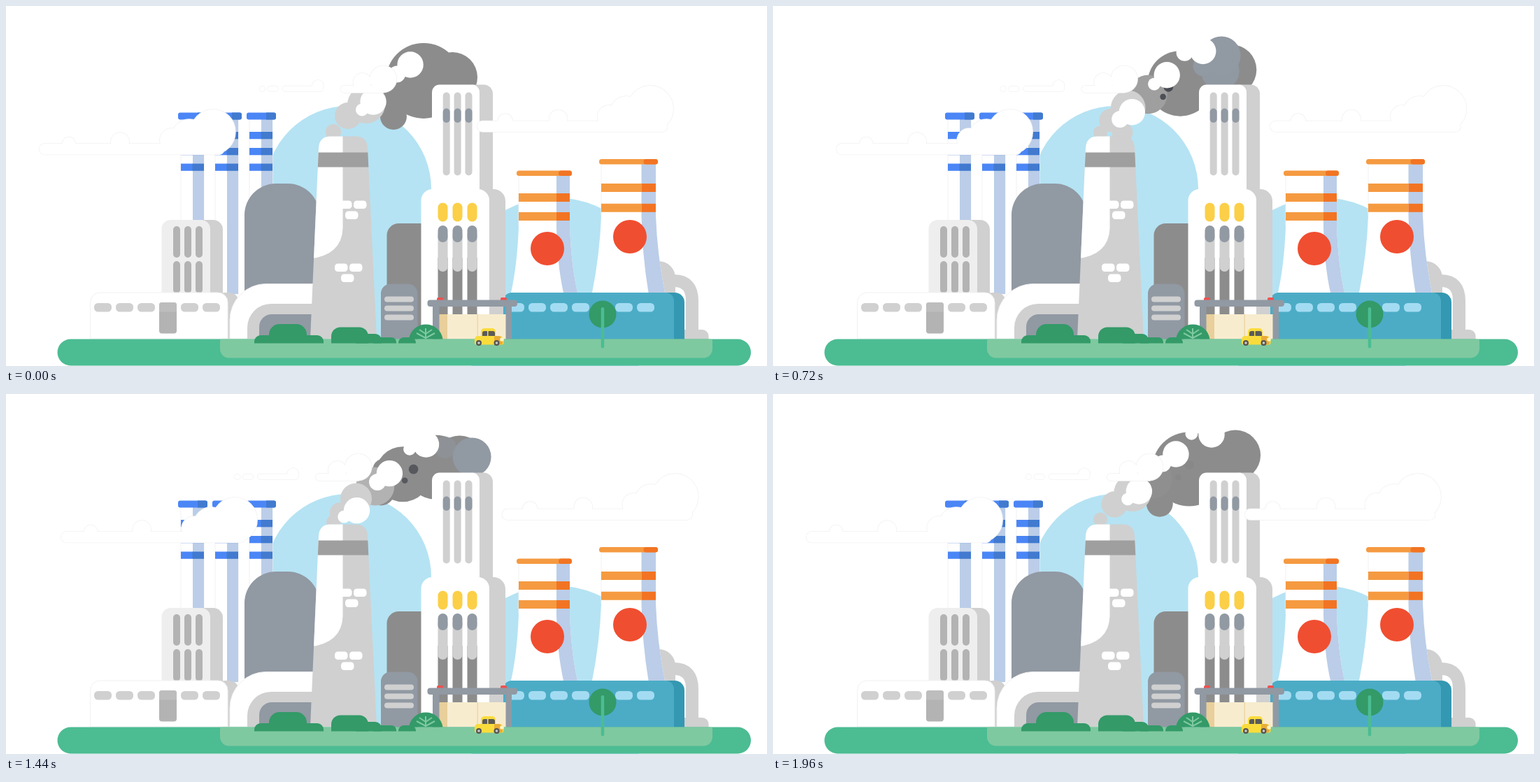
Write an HTML page with a canvas that moves like this. It is 1088 px wide and 515 px high and loops after 2 s.

```html
<!DOCTYPE html>
<html lang="en">
<head>
<meta charset="utf-8">
<title>Factory</title>
<style>
html, body { margin: 0; width: 100%; height: 100%; overflow: hidden; background: #fff; }
canvas { display: block; width: 1088px; height: 515px; }
</style>
</head>
<body>
<canvas id="stage"></canvas>
<script>
const canvas = document.getElementById('stage');
const c = canvas.getContext('2d');
const dpr = window.devicePixelRatio || 1;
canvas.width = 1088 * dpr;
canvas.height = 515 * dpr;

const WHITE = '#fff', LINE = '#f1f1f1', SKY = '#b5e3f3', LIGHT = '#d0d0d0', MID = '#b3b3b3',
  DARK = '#8c8c8c', SLATE = '#9199a3', BLUE = '#4b86f6', NAVY = '#417acf', PALE = '#bbcde8',
  ORANGE = '#f59a41', RUST = '#f27423', LEAF = '#339a68', MINT = '#4cbc93', GRASS = '#7fc9a0';

// Rounded box given by its corners; r may be a list of four radii.
function box(x1, y1, x2, y2, color, r = 0, line) {
  c.beginPath();
  c.roundRect(x1, y1, x2 - x1, y2 - y1, r);
  c.fillStyle = color;
  c.fill();
  if (line) outline(line);
}
function outline(color, width = 1) {
  c.strokeStyle = color;
  c.lineWidth = width;
  c.stroke();
}
function disc(x, y, r, color, alpha = 1) {
  c.globalAlpha = alpha;
  c.beginPath();
  c.arc(x, y, r, 0, 7);
  c.fillStyle = color;
  c.fill();
  c.globalAlpha = 1;
}
function shape(d, color) {
  c.fillStyle = color;
  c.fill(new Path2D(d));
}
function wire(d, color, width) {
  c.strokeStyle = color;
  c.lineWidth = width;
  c.stroke(new Path2D(d));
}
const domed = r => [r, r, 0, 0];
const clamp = v => Math.max(0, Math.min(1, v));

// Position along evenly timed points, where u counts segments.
function along(points, u) {
  const i = Math.max(0, Math.min(points.length - 2, Math.floor(u)));
  return points[i].map((v, k) => v + (points[i + 1][k] - v) * (u - i));
}

// A cloud: one bar and several discs sharing a faint outline.
function cloud(dx, bar, discs) {
  const [x1, y1, x2, y2] = bar;
  c.save();
  c.translate(dx, 0);
  c.beginPath();
  c.roundRect(x1, y1, x2 - x1, y2 - y1, (y2 - y1) / 2);
  for (const [x, y, r] of discs) {
    c.moveTo(x + r, y);
    c.arc(x, y, r, 0, 2 * Math.PI);
  }
  outline(LINE, 1.5);
  c.fillStyle = WHITE;
  c.fill();
  c.restore();
}

// Places one second apart on the way up: x, y, radius.
const PLUME = [[468, 180, 11], [489, 157, 19], [515, 141, 27], [544, 121, 28], [597, 107, 54], [638, 102, 36], [662, 87, 36]];
const PUFF = [[483, 190], [525, 137], [578, 84], [629, 57]];
const PUFFLET = [[463, 197], [509, 148.5], [559, 97.5], [600, 55]];

function smoke(t) {
  const back = t < 1000 ? t / 350 : (2000 - t) / 700;
  if (back < 1) disc(554 - 22 * back, 158 - 22 * back, 19, DARK);
  if (t > 200) disc(...along([[510, 136], [516, 113], [560, 105]], (t - 200) / 800), 16, DARK);

  for (let k = 5; k >= 0; k--) {
    const age = t % 1000 / 1000 + k;
    const g = 208 - 68 * clamp(age - 2);
    disc(...along(PLUME, age), `rgb(${g},${g},${g})`);
  }
  disc(468, 186 - t % 1000 / 150, 10, LIGHT);
  if (t > 400 && t < 1400) disc(...along([[494, 192], [511, 158]], (t - 400) / 1000), 15, LIGHT);

  if (t < 1900) disc(...along([[612, 102], [648, 90], [683, 90]], t / 950), 27.5, SLATE, clamp(t / 800));
  if (t < 1000) disc(626 + 21 * t / 1000, 76 - 7 * t / 1000, 27.5, SLATE, clamp(t / 250));
  const u = (t - 400) / 1300;
  if (u > 0 && u < 1) disc(609 + 24 * u, 90 - 17 * u, 14 + 2 * u, SLATE, clamp(Math.min(4 * u, 2 - 2 * u)));

  const soot = 1 - Math.abs(t - 1000) / 1000;
  disc(548 + t * .024, 124.5 - t * .0117, 6.8, '#2d303a', soot);
  disc(545 + t * .0175, 136 - t * .0085, 4.3, '#2d303a', soot);
  puffs(t, 12);
  puffs((t + 1000) % 2000, 9);
}
function puffs(t, r) {
  for (const age of [t / 1000, t / 1000 + 2]) {
    if (age >= 3) continue;
    const grow = clamp(age / .35);
    disc(...along(PUFF, age), 18.7 * grow, WHITE);
    disc(...along(PUFFLET, age), r * grow, WHITE);
  }
}

function stack(x, bottom) {
  box(x, 160, x + 33, bottom, WHITE, 0, LINE);
  box(x + 17, 160, x + 33, bottom, PALE);
  for (const y of [180, 203, 225.5]) {
    box(x, y, x + 17, y + 10.3, BLUE);
    box(x + 16.5, y, x + 33, y + 10.3, NAVY);
  }
  box(x - 4, 152.5, x + 38, 162.5, BLUE, 3);
  box(x + 24, 152.5, x + 38, 162.5, NAVY, [0, 3, 3, 0]);
}

function cooler(l, r, split, y, bands, flare, fl, fr, logoX, logoY) {
  const right = `V${flare} Q${r + 2} ${flare + 55} ${fr} 410`;
  const left = `Q${l - 2} ${flare + 55} ${l} ${flare}Z`;
  shape(`M${l} ${y} H${r} ${right} H${fl} ${left}`, WHITE);
  wire(`M${l} ${y} V${flare}`, LINE, 1);
  shape(`M${split} ${y} H${r} ${right} H${split + 10} Q${split + 1} ${flare + 55} ${split} ${flare}Z`, PALE);
  for (const b of bands) {
    box(l, b, split, b + 12, ORANGE);
    box(split, b, r, b + 12, RUST);
  }
  box(l - 3, y - 3.5, r + 3, y + 4, ORANGE, 3.5);
  box(split + 3, y - 3.5, r + 3, y + 4, RUST, 3.5);
  disc(logoX, logoY, 24, '#f04e30');
}

function leftPlant() {
  box(262, 306, 310, 415, LIGHT, domed(14));
  box(222.5, 306, 292, 415, '#eee', domed(13));
  for (const x of [239, 255, 271]) {
    box(x, 315, x + 10, 360, MID, 5);
    box(x, 365, x + 10, 411, MID, 5);
  }
  box(341, 254, 448, 476, SLATE, domed(45));
  box(300, 410, 333, 476, LIGHT, domed(14));
  box(120.5, 410, 317, 476, WHITE, domed(14), LINE);
  for (let x = 126; x < 300; x += 31) box(x, 425, x + 25, 437.5, LIGHT, 5.5);
  box(219, 424, 244, 468.5, MID, 4);
  box(219, 424, 244, 437.5, '#bdbdbd', domed(4));
  box(320, 397.5, 460, 476, WHITE, [52, 0, 0, 0], LINE);
  box(345, 426, 460, 476, LIGHT, [34, 0, 0, 0]);
  box(362, 441, 460, 476, SLATE, [18, 0, 0, 0]);
}

function chimney() {
  const body = 'M435 476 L447 203 Q448 186.5 464 186.5 H500 Q516 186.5 517 203 L530 476Z';
  shape(body, LIGHT);
  c.save();
  c.clip(new Path2D(body));
  shape('M430 180 H481.5 V318 Q480 358 430 362Z', WHITE);
  box(430, 209.5, 530, 230.5, '#9f9f9f');
  c.restore();
  for (const [x, y] of [[476, 278.5], [470, 368.5]]) {
    for (const [dx, dy] of [[0, 0], [21, 0], [9, 15]])
      box(x + dx, y + dy, x + dx + 18.5, y + dy + 11.5, WHITE, 4.5);
  }
}

function tower() {
  box(655, 112.5, 696, 280, LIGHT, domed(13));
  box(609, 112.5, 677, 280, WHITE, domed(11));
  for (const x of [624.7, 640.6, 656.5]) {
    box(x, 123.5, x + 10, 242.5, LIGHT, 5);
    box(x, 146.5, x + 10, 167, SLATE, 5);
  }
  box(660, 262, 714, 476, LIGHT, domed(17));
  box(593.5, 262, 691, 476, WHITE, domed(16));
  for (const x of [617.5, 638.5, 659.5]) {
    box(x, 281.5, x + 14, 308.5, '#fbcf47', 7);
    box(x, 360, x + 14, 442, DARK);
    box(x, 320, x + 14, 380, LIGHT, 7);
    box(x, 314, x + 14, 338, SLATE, 7);
  }
}

function rightPlant() {
  box(915, 365, 957, 420, LIGHT, [0, 24, 0, 0]);
  wire('M945 393 H955 Q981 393 981 422 V470', LIGHT, 18);
  box(950, 463, 1004.5, 477, LIGHT, domed(9));
  cooler(733, 806, 787, 239, [268, 295], 315, 722, 817, 774, 347);
  cooler(851, 929, 908.5, 222.5, [254, 282.8], 300, 838, 942, 892, 330);
  box(915, 410, 970, 477, '#3498b2', domed(14));
  box(711, 410, 955, 477, '#4cacc6', domed(12));
  for (let x = 716; x < 910; x += 31) box(x, 425, x + 25, 437.5, '#a3dcf2', 5.5);
}

function garage() {
  box(619, 441, 715, 477, '#f8eccf');
  box(619, 441, 631, 477, '#e8cf9b');
  box(673.5, 441, 675, 477, '#ecd7a4');
  box(610, 428, 619.5, 477, SLATE);
  box(714.5, 428, 723, 477, SLATE);
  box(616, 417, 625, 424, '#f0504f', 2);
  box(707, 417, 716, 424, '#f0504f', 2);
  box(602.5, 420.5, 731, 430, SLATE, 4);
}

function garden() {
  box(73.5, 476.5, 1065, 514.5, MINT, 19);
  box(306, 476.5, 1010, 503.5, GRASS, [3, 3, 13, 13]);
  box(355, 471, 454, 482.5, LEAF, domed(9));
  box(376, 455, 430, 475, LEAF, domed(15));
  box(465, 459.5, 518, 482.5, LEAF, domed(13));
  box(500, 469, 537, 482.5, LEAF, domed(9));
  box(525, 474, 558, 482.5, LEAF, domed(7));
  box(561, 474, 586, 482.5, LEAF, domed(8));
  shape('M576 476.5 A24.5 24.5 0 0 1 624.5 476.5Z', LEAF);
  wire('M600 461 V476 M591 463 L600 469 L609 463 M587 468 L600 475 L613 468', GRASS, 2);
  disc(853, 441, 19.5, LEAF);
  box(850.7, 431, 855.2, 489.5, MINT, 2.2);
}

function car() {
  box(679, 461, 700, 476, '#f9dc3c', domed(5));
  box(681, 465, 688, 472.5, '#5a5a5a', [3, 1, 1, 1]);
  box(689.5, 465, 699, 472.5, '#5a5a5a', [1, 3, 1, 1]);
  box(670, 472, 711.5, 484.5, '#f9dc3c', [5, 6, 3, 3]);
  box(698, 472, 710, 484.5, '#e8ac38', [2, 6, 3, 2]);
  disc(709, 477, 2.8, '#fff3c4');
  for (const x of [676, 701.5]) {
    disc(x, 482, 4, '#555');
    disc(x, 482, 1.8, '#ccc');
  }
}

function scene(t) {
  const sway = lag => (1 - Math.cos(Math.PI * (t - lag) / 1000)) / 2;
  const slow = 52 * sway(70);
  c.setTransform(dpr, 0, 0, dpr, 0, 0);
  c.fillStyle = WHITE;
  c.fillRect(0, 0, 1088, 515);

  box(371, 143, 608, 476, SKY, domed(118.5));
  disc(785, 424, 150, SKY);
  stack(250, 310);
  stack(299, 412);
  stack(348, 300);
  cloud(52.7 * sway(0), [47.5, 197, 312, 212.5],
    [[90, 197, 9.5], [163, 194, 13], [237, 192, 17], [262, 187, 25], [296, 180, 32]]);

  smoke(t);
  cloud(-slow, [479, 114, 545, 124], [[510, 109, 13], [540, 104.5, 19]]);
  cloud(-slow, [363, 115, 371, 122], []);
  cloud(-slow, [375, 115, 389.5, 122], []);
  cloud(-slow, [396, 114.5, 454, 122], [[446.5, 114, 8]]);

  box(544.5, 311, 600, 476, DARK, [17, 0, 0, 0]);
  leftPlant();
  chimney();
  box(536, 397.5, 588.5, 477, SLATE, domed(14));
  for (const y of [415.5, 428.5, 441.5]) box(541, y, 583, y + 8, LIGHT, 4);
  rightPlant();
  tower();
  box(711, 424, 715, 477, '#4cacc6');
  garage();
  garden();
  car();
  cloud(slow, [673, 164.5, 945, 180],
    [[713, 164.5, 10.5], [789, 161.5, 13], [861, 158, 16], [886, 152, 23], [920.5, 147, 33]]);
}

function tick() {
  scene(performance.now() % 2000);
  requestAnimationFrame(tick);
}
tick();
</script>
</body>
</html>
```
